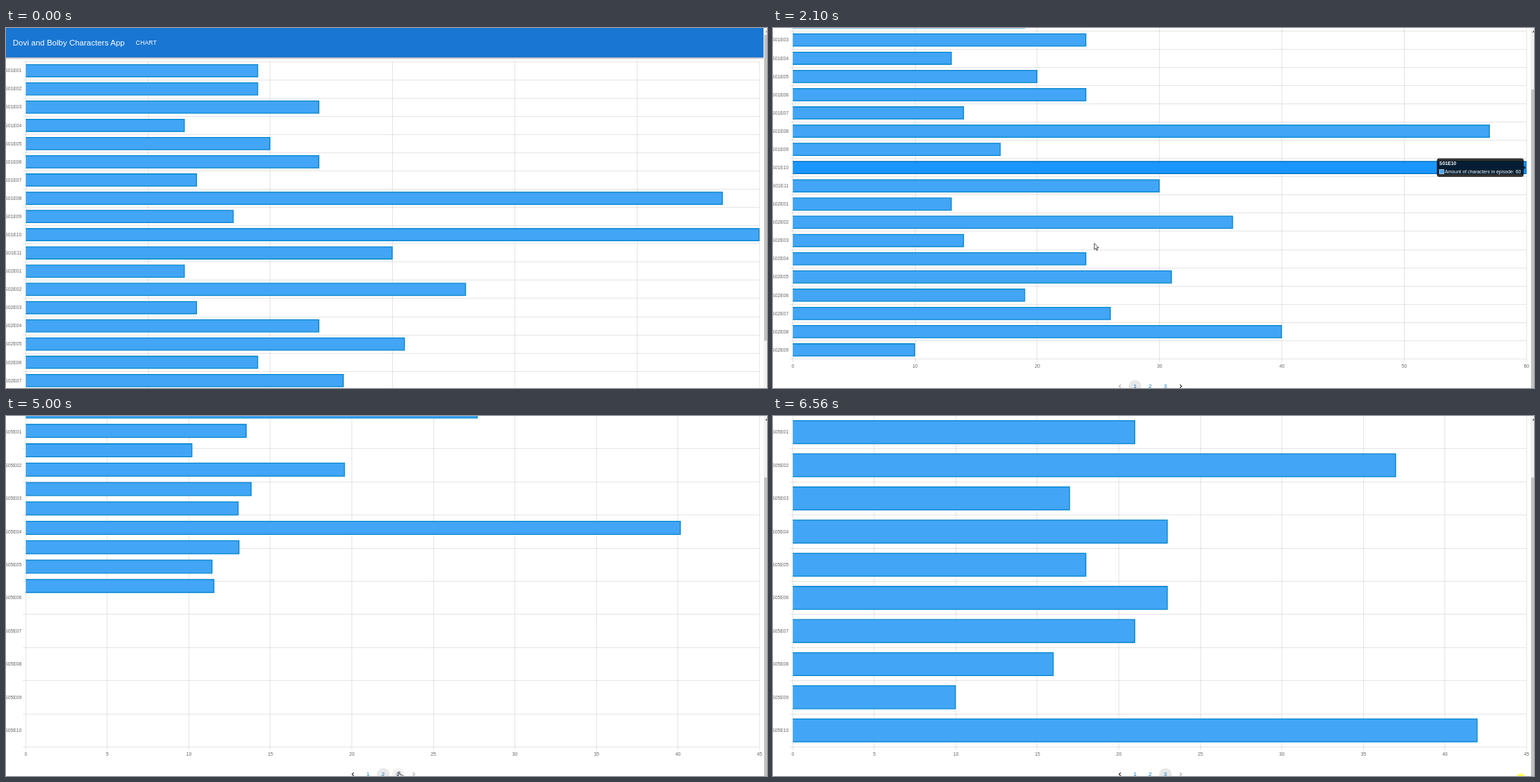
These frames come from a looping animation (1088 px wide and 515 px high, 6.63 s). An HTML page:

```html
<!DOCTYPE html>
<html lang="en">
<head>
<meta charset="utf-8">
<title>Episode chart</title>
<style>
  html, body { margin: 0; width: 100%; height: 100%; overflow: hidden; background: #fff; }
  svg { display: block; width: 100%; height: 100%; font-family: "Liberation Sans", Arial, Helvetica, sans-serif; }
  .grid line { stroke: #000; stroke-opacity: .1; shape-rendering: crispEdges; }
  .grid text { font-size: 6.8px; fill: #666; }
  .bar { stroke-width: 1.3; }
  .bar-header { filter: drop-shadow(0 1.2px 1.6px rgba(0, 0, 0, .45)); }
  .tip text { font-size: 6.8px; fill: #fff; }
  .pager text { font-size: 7.94px; fill: #0b7bc8; text-anchor: middle; }
  .chevron { fill: none; stroke: #222; stroke-width: 1.1; }
</style>
</head>
<body>
<svg id="stage" viewBox="0 0 1088 515" preserveAspectRatio="none"></svg>
<script>
const LOOP = 6630;
const LEFT = 28.3, WIDTH = 1049, TOP = 48, HEIGHT = 521.5, BOTTOM = TOP + HEIGHT;
const MAX_SCROLL = 96, PAGER_Y = 608.6;
const TIP_W = 124.2, TIP_H = 26.6;

// "from" is the moment the page takes over, "s"/"e" its first season and episode.
const pages = [
  { from: 0, max: 60, step: 10, s: 1, e: 1,
    values: [19, 19, 24, 13, 20, 24, 14, 57, 17, 60, 30, 13, 36, 14, 24, 31, 19, 26, 40, 10] },
  { from: 3542, max: 70, step: 10, s: 2, e: 10,
    values: [25, 44, 18, 15, 30, 21, 19, 65, 20, 18, 14, 38, 24, 23, 14, 29, 49, 14, 21, 10] },
  { from: 4981, max: 45, step: 5, s: 4, e: 10,
    values: [20, 21, 37, 17, 23, 18, 23, 21, 16, 10, 42] }
];
const presses = [{ at: 3430, item: 1 }, { at: 4925, item: 2 }];

// Hovered rows on the first page.
const hovers = [
  { row: 9, on: 1190, off: 2190 },
  { row: 15, on: 2190, off: 2395 },
  { row: 18, on: 2395, off: 2405 }
];

// Pointer: time, x, y
const path = [
  [590, 1052, 506], [800, 805, 400], [1000, 665, 340], [1130, 540, 312], [1200, 457, 303],
  [2090, 457, 303], [2190, 478, 348], [2395, 527, 428], [2405, 529, 444], [2590, 552, 497],
  [2730, 549, 504], [2940, 545, 509], [4850, 545, 509], [4925, 562, 509],
  [5850, 562, 509], [6160, 1028, 506], [6240, 1039, 507], [6290, 1039, 507]
];

const clamp = v => Math.max(0, Math.min(1, v));
const mix = (a, b, p) => a + (b - a) * p;
const span = (t, start, length) => clamp((t - start) / length);
const outQuart = p => 1 - (1 - p) ** 4;
const smooth = p => p * p * (3 - 2 * p);
const mixColor = (a, b, p) => `rgb(${a.map((v, i) => Math.round(mix(v, b[i], p)))})`;

function add(parent, tag, attrs = {}, text) {
  const node = document.createElementNS("http://www.w3.org/2000/svg", tag);
  set(node, attrs);
  if (text !== undefined) node.textContent = text;
  parent.appendChild(node);
  return node;
}
function set(node, attrs) {
  for (const key in attrs) node.setAttribute(key, attrs[key]);
}
const show = (node, on) => node.setAttribute("display", on ? "inline" : "none");

const SEASON_LENGTH = [0, 11, 10, 10, 10, 10];
function episodeNames({ s, e, values }) {
  return values.map(() => {
    const name = `S0${s}E${String(e).padStart(2, "0")}`;
    if (++e > SEASON_LENGTH[s]) { s++; e = 1; }
    return name;
  });
}

const rowHeight = page => HEIGHT / page.values.length;
const barBox = (page, row) => ({
  end: LEFT + WIDTH * page.values[row] / page.max,
  mid: TOP + rowHeight(page) * (row + .5),
  size: rowHeight(page) * .72
});

const stage = document.getElementById("stage");
const doc = add(stage, "g");

function buildGrid(page) {
  const g = add(doc, "g", { class: "grid" });
  const line = (x1, y1, x2, y2) => add(g, "line", { x1, y1, x2, y2 });
  const h = rowHeight(page);
  for (let i = 0; i <= page.values.length; i++) {
    line(LEFT - 4.5, TOP + i * h, LEFT + WIDTH, TOP + i * h);
  }
  for (let v = 0; v <= page.max; v += page.step) {
    const x = LEFT + WIDTH * v / page.max;
    line(x, TOP, x, BOTTOM + 4.5);
    add(g, "text", { x, y: BOTTOM + 12.6, "text-anchor": "middle" }, v);
  }
  page.names = episodeNames(page);
  page.names.forEach((name, i) =>
    add(g, "text", { x: 22.3, y: TOP + (i + .5) * h + 2.3, "text-anchor": "end" }, name));
  return g;
}
const grids = pages.map(buildGrid);
const bars = pages[0].values.map(() => add(doc, "path", { class: "bar" }));

// Header
add(doc, "rect", { class: "bar-header", x: -10, y: -10, width: 1093, height: 52, fill: "#1976d2" });
add(doc, "text", { x: 9.8, y: 25, "font-size": 11.34, "letter-spacing": ".0075em", fill: "#fff" },
  "Dovi and Bolby Characters App");
add(doc, "text", { x: 185.6, y: 24, "font-size": 8.5, "letter-spacing": ".02em", fill: "#fff" }, "CHART");

// Pagination
const pager = add(doc, "g", { class: "pager" });
const pageX = i => 517.6 + 21.7 * i;
const items = pages.map((_, i) => {
  const disc = { cx: pageX(i), cy: PAGER_Y, r: 9 };
  const back = add(pager, "circle", disc);
  const ripple = add(pager, "circle", disc);
  add(pager, "text", { x: pageX(i), y: PAGER_Y + 2.8 }, i + 1);
  return { back, ripple };
});
const chevron = (x, dir) => add(pager, "path", {
  class: "chevron", d: `M${x - dir * 1.2} ${PAGER_Y - 2.4}l${dir * 2.4} 2.4l${-dir * 2.4} 2.4`
});
const prev = chevron(496, -1), next = chevron(583, 1);

// Tooltip
const tip = add(doc, "g", { class: "tip" });
add(tip, "path", {
  fill: "rgba(0,0,0,.8)",
  d: `M3.4 0H${TIP_W - 3.4}q3.4 0 3.4 3.4V${TIP_H / 2 - 2.8}l2.8 2.8l-2.8 2.8V${TIP_H - 3.4}` +
     `q0 3.4-3.4 3.4H3.4q-3.4 0-3.4-3.4V3.4q0-3.4 3.4-3.4Z`
});
const tipTitle = add(tip, "text", { x: 3.5, y: 9.8, "font-weight": "bold" });
add(tip, "rect", { x: 3.7, y: 16, width: 6.3, height: 6.3, fill: "#42a5f5", stroke: "#fff", "stroke-width": .6 });
const tipBody = add(tip, "text", { x: 11.3, y: 21.5 });

// Scrollbar
add(stage, "rect", { x: 1083, width: 5, height: 515, fill: "#f1f1f1" });
const thumb = add(stage, "rect", { x: 1084, width: 4, height: 437.5, fill: "#c1c1c1" });
const upArrow = add(stage, "path", { d: "M1085.4 6.2l2.4-2.6l2.4 2.6Z" });

// Pointer shapes and click mark
const pointer = add(stage, "g", { fill: "#fff", stroke: "#111", "stroke-width": 1.3 });
const arrow = add(pointer, "path", { d: "M0 0V16L3.7 12.5L6 18.2L8.6 17L6.2 11.6H11.3Z" });
const hand = add(pointer, "path", {
  d: "M-1.6 1.5a1.6 1.6 0 0 1 3.2 0V7l6.5 1.5a2 2 0 0 1 2 2L9 17l-1 4H-1L-6 12a1.6 1.6 0 0 1 2.5-1.5L-1.6 12Z"
});
const mark = add(stage, "circle", { cx: 1069, cy: 517, r: 6, fill: "#ffff5c" });

function hoverLevel(row, t) {
  const h = hovers.find(item => item.row === row);
  return h ? outQuart(span(t, h.on, 400)) * (1 - outQuart(span(t, h.off, 400))) : 0;
}

function drawBars(t, current) {
  const page = pages[current], old = pages[Math.max(0, current - 1)];
  const p = current ? outQuart(span(t, page.from, 1000)) : 1;
  bars.forEach((bar, row) => {
    const used = row < page.values.length;
    show(bar, used);
    if (!used) return;
    const a = barBox(old, row), b = barBox(page, row);
    const end = mix(a.end, b.end, p) - .65;
    const half = mix(a.size, b.size, p) / 2 - .65;
    const mid = mix(a.mid, b.mid, p);
    const level = hoverLevel(row, t);
    set(bar, {
      d: `M${LEFT} ${mid - half}H${end}V${mid + half}H${LEFT}`,
      fill: mixColor([66, 165, 245], [26, 150, 255], level),
      stroke: mixColor([2, 132, 205], [0, 112, 192], level)
    });
  });
}

function tipPlace(i, t) {
  const { end, mid } = barBox(pages[0], hovers[i].row);
  const goal = [end - 4 - TIP_W, mid - TIP_H / 2];
  if (i === 0) return goal;
  const p = outQuart(span(t, hovers[i].on, 400));
  return tipPlace(i - 1, hovers[i].on).map((v, k) => mix(v, goal[k], p));
}

function drawTip(t) {
  const opacity = span(t, hovers[0].on, 200) * (1 - span(t, hovers[2].off, 200));
  show(tip, opacity > 0);
  if (!opacity) return;
  const i = hovers.filter(h => t >= h.on).length - 1;
  const { row } = hovers[i];
  set(tip, { transform: `translate(${tipPlace(i, t)})`, opacity });
  tipTitle.textContent = pages[0].names[row];
  tipBody.textContent = `Amount of characters in episode: ${pages[0].values[row]}`;
}

function pointerAt(t) {
  const i = path.findIndex(point => point[0] > t);
  if (i < 1) return null;
  const [a, b] = [path[i - 1], path[i]];
  const p = span(t, a[0], b[0] - a[0]);
  return { x: mix(a[1], b[1], p), y: mix(a[2], b[2], p) };
}

const overItem = (pos, i, scroll) =>
  pos !== null && Math.hypot(pos.x - pageX(i), pos.y + scroll - PAGER_Y) < 9;

function drawPager(t, current, pos, scroll) {
  items.forEach(({ back, ripple }, i) => {
    const since = pages[i].from;
    const gone = i < 2 ? span(t, pages[i + 1].from, 250) : 0;
    const chosen = (i ? span(t, since, 250) : 1) * (1 - gone);
    const hovered = overItem(pos, i, scroll) ? .04 : 0;
    set(back, { "fill-opacity": .09 * chosen + hovered });
    const press = presses.find(item => item.item === i);
    const grow = press ? smooth(span(t, press.at, 160)) : 0;
    const fade = press ? 1 - span(t, press.at + 450, 500) : 0;
    set(ripple, { r: 9 * grow, "fill-opacity": .13 * fade });
  });
  set(prev, { opacity: current === 0 ? .38 : 1 });
  set(next, { opacity: current === 2 ? .38 : 1 });
}

function drawPointer(pos, scroll) {
  show(pointer, pos !== null);
  if (!pos) return;
  const onItem = items.some((_, i) => overItem(pos, i, scroll));
  show(hand, onItem);
  show(arrow, !onItem);
  set(pointer, { transform: `translate(${pos.x} ${pos.y}) scale(.567)` });
}

function draw(t) {
  const current = pages.filter(page => t >= page.from).length - 1;
  const scroll = MAX_SCROLL * smooth(span(t, 1250, 474));
  const pos = pointerAt(t);
  set(doc, { transform: `translate(0 ${-scroll})` });
  set(thumb, { y: 9.7 + scroll * .815 });
  set(upArrow, { fill: scroll > 0 ? "#505050" : "#a3a3a3" });
  grids.forEach((grid, i) => show(grid, i === current));
  drawBars(t, current);
  drawTip(t);
  drawPager(t, current, pos, scroll);
  drawPointer(pos, scroll);
  show(mark, t >= 6560);
}

function tick() {
  draw(performance.now() % LOOP);
  requestAnimationFrame(tick);
}
tick();
</script>
</body>
</html>
```
